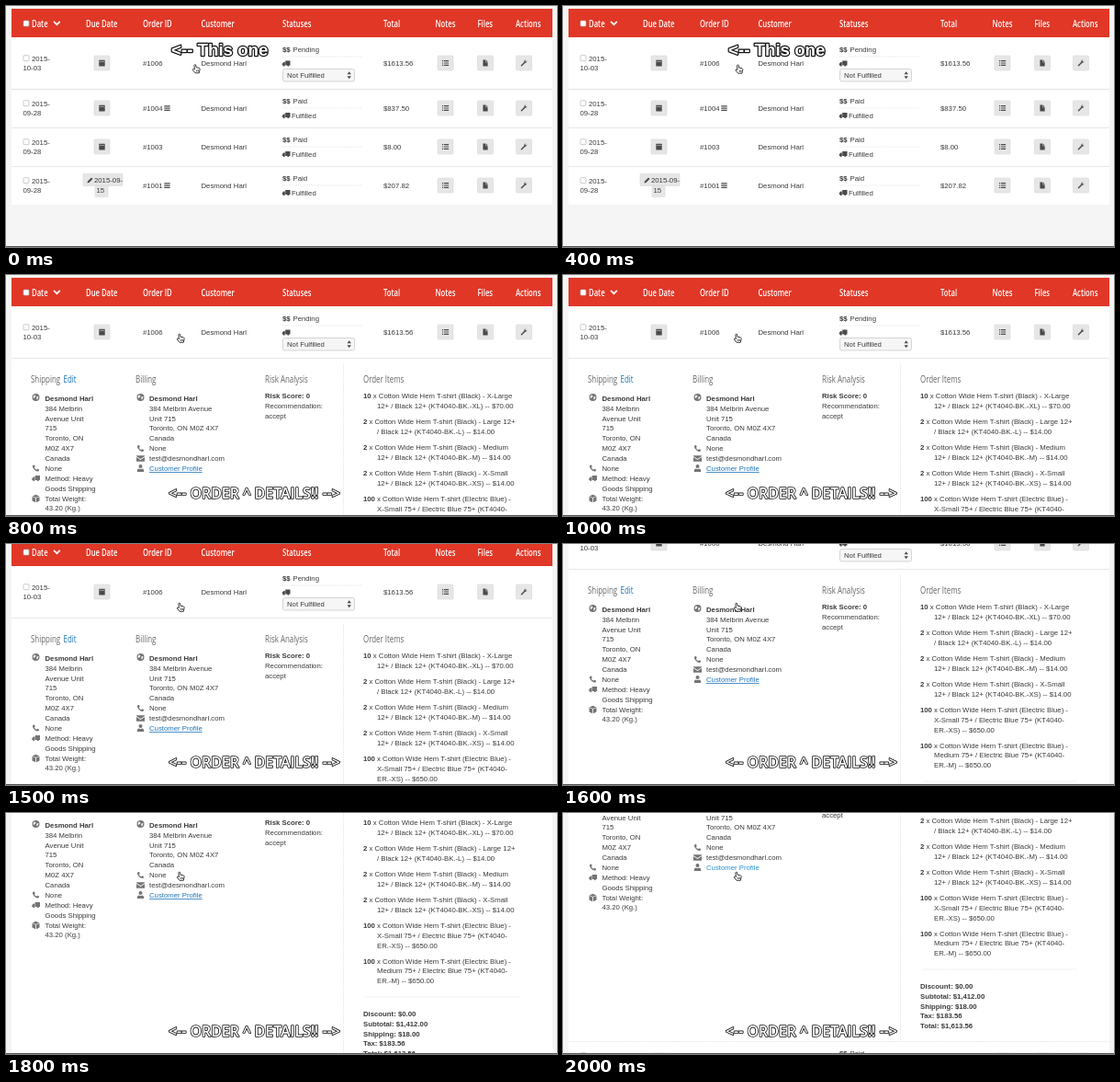
An HTML page that plays this animation: 600x262 px, repeating every 2.8 s.

```html
<!DOCTYPE html>
<html lang="en">
<head>
<meta charset="utf-8">
<title>Order details</title>
<style>
html, body { margin: 0; width: 100%; height: 100%; overflow: hidden; background: #f5f5f5; }
svg { display: block; }
text { font: 7.75px "Liberation Sans", Arial, sans-serif; fill: #3a3a3a; white-space: pre; }
.b { font-weight: 700; }
.head, .title, .edit { font: 11px "Open Sans", "Noto Sans", sans-serif; fill: #666; }
.head { font-weight: 600; fill: #fff; }
.edit, .link { fill: #1b74b8; }
.link { text-decoration: underline; }
.link.hover { fill: #2590d6; text-decoration: none; }
.icon { fill: #4a4a4a; fill-rule: evenodd; }
.soft { fill: #747474; }
.btn { fill: #e6e6e6; stroke: #d8d8d8; stroke-width: .6; }
.box { fill: #fff; stroke: #b5b5b5; stroke-width: .7; }
.select { fill: #f6f6f6; stroke: #c4c4c4; stroke-width: .7; }
.rule { stroke: #e8e8e8; }
.dots { stroke: #dedede; stroke-width: .8; stroke-dasharray: 1.2 1.2; }
.note { font: 700 18.7px "Liberation Sans", Arial, sans-serif; stroke-width: 2.4px; }
.comic { font: 600 15.9px "Open Sans", "Noto Sans", sans-serif; stroke-width: 1.6px; }
.note, .comic { fill: #fff; stroke: #111; stroke-linejoin: round; paint-order: stroke; }
</style>
</head>
<body>
<svg id="stage" width="600" height="262" viewBox="0 0 600 262">
  <rect width="600" height="262" fill="#f5f5f5"/>
  <g id="page">
    <rect id="sheet" x="6" y="3" width="589" height="213" fill="#fff"/>
    <g id="top"></g>
    <svg id="panel" y="90" width="600" height="0" overflow="hidden"><g id="details" transform="translate(0 -90)"></g></svg>
    <g id="rest"></g>
  </g>
  <text id="thisOne" class="note" x="180" y="54">&lt;-- This one</text>
  <text id="caption" class="comic" x="270.5" y="243" text-anchor="middle">&lt;-- ORDER ^ DETAILS!! --&gt;</text>
  <path id="hand" fill="#fff" stroke="#222" stroke-width=".9" stroke-linejoin="round"
    d="M-1.9.8L-2.4-4Q-1.6-5.5-.7-4.3L-.2-1.6 3.1-.9Q4-.5 3.8.8L3 4.5H-1.3L-3.9 1.4Q-4-.3-2.6.2zM.4 1.2V3M2 1.2V3"/>
  <rect y="261" width="600" height="1" fill="#555"/>
</svg>
<script>
const $ = id => document.getElementById(id);
const LINE = 10.87, PANEL = 309, LOOP = 2800;

const ICONS = {
  calendar: 'M-3.2-3.2H3.2V3.4H-3.2zM-2.6-1.5H2.6V-1H-2.6z',
  list: 'M-3.6-3h1.2v1.2h-1.2zM-1.6-3h5.2v1.2h-5.2zM-3.6-.6h1.2v1.2h-1.2zM-1.6-.6h5.2v1.2h-5.2zM-3.6 1.8h1.2v1.2h-1.2zM-1.6 1.8h5.2v1.2h-5.2z',
  file: 'M-2.6-3.4H.4V-.8H2.6V3.4H-2.6zM.9-3.4L2.6-1.3H.9z',
  wrench: 'M-3.4 2.4L.1-1.1Q0-3.4 2.4-3.4L1.3-2.2 2.2-1.3 3.4-2.4Q3.4 0 1.1-.1L-2.4 3.4Q-3.2 3.6-3.4 2.4z',
  pencil: 'M-3 3L-2.5 1 1.5-3 3-1.5-1 2.5z',
  bars: 'M-3.2-2.8h6.4v1.2h-6.4zM-3.2-.5h6.4v1.2h-6.4zM-3.2 1.8h6.4v1.2h-6.4z',
  truck: 'M4.5-3H-.8V2H4.5zM-1.2-1.6H-2.7L-4.2.2V2H-1.2zM-3.4 2.1a1.1 1.1 0 0 0 2.2 0zM1.2 2.1a1.1 1.1 0 0 0 2.2 0z',
  globe: 'M-4 0a4 4 0 1 0 8 0a4 4 0 1 0-8 0zM-2-2.6l2 .5-.5 1.5-1.5 1.5L-3 0zM.8-.5L3-1 2 2 1 2.5z',
  phone: 'M-3-3.2L-1.5-3.6-.7-1.6-1.7-.7Q-1 1 .7 1.7L1.6.7 3.6 1.5 3.2 3Q2 4.2-.4 2.7-2.8 1-3.6-1.5-3.6-2.8-3-3.2z',
  mail: 'M-4.5-3.2H4.5V-2.4L0 .6-4.5-2.4zM-4.5-1.5L0 1.5 4.5-1.5V3.2H-4.5z',
  user: 'M-2-2a2 2 0 1 1 4 0a2 2 0 1 1-4 0zM-3.7 4Q-4 .6-1.5.4 0 1.4 1.5.4 4 .6 3.7 4z',
  cube: 'M0-4.2L3.8-2.6 0-1-3.8-2.6zM-4-1.9L-.4-.4V4.2L-4 2.6zM4-1.9L.4-.4V4.2L4 2.6z'
};

// y is the middle of the text line
const text = (x, y, s, cls = '') => `<text x="${x}" y="${y + 2.8}" class="${cls}">${s}</text>`;
const narrow = (x, y, s, cls) =>
  `<text transform="translate(${x} ${y + 4}) scale(${cls === 'head' ? .7 : .72} 1)" class="${cls}">${s}</text>`;
const lines = (x, y, list, cls) => list.map((s, i) => text(x, y + i * LINE, s, cls)).join('');
const bold = s => `<tspan class="b">${s}</tspan>`;
const icon = (name, x, y, cls = '') => `<path class="icon ${cls}" transform="translate(${x} ${y})" d="${ICONS[name]}"/>`;
const rect = (x, y, w, h, cls, r = 1) => `<rect x="${x}" y="${y}" width="${w}" height="${h}" rx="${r}" class="${cls}"/>`;
const line = (x1, y1, x2, y2, cls) => `<path class="${cls}" d="M${x1} ${y1}L${x2} ${y2}"/>`;
const button = (name, x, y) => rect(x - 8.5, y - 8, 17, 16, 'btn') + icon(name, x, y);

function row(y, o) {
  const first = o.open, dateY = y - 5.3, payY = y - (first ? 14.5 : 7.5);
  let s = rect(19, dateY - 3, 6, 6, 'box') + text(28, dateY, '2015-') + text(18.5, dateY + LINE, o.day);
  if (o.due) {
    s += rect(84, y - 12.5, 43, 13, 'btn') + rect(97, y + .5, 14, 12, 'btn') + icon('pencil', 91.5, y - 5.5)
      + text(96, y - 5.5, '2015-09-') + text(98.5, y + 5.5, '15');
  } else s += button('calendar', 104.5, y);
  s += text(149, y, '#' + o.id) + (o.bars ? icon('bars', 175.5, y) : '') + text(212.5, y, 'Desmond Harl')
    + text(301, payY, bold('$$')) + text(312.5, payY, first ? 'Pending' : 'Paid')
    + line(301, payY + 7.5, 388, payY + 7.5, 'dots');
  if (first) {
    s += icon('truck', 305, y + .5) + rect(301.5, y + 6.5, 78, 13.5, 'select', 2) + text(306, y + 13.2, 'Not Fulfilled')
      + `<path class="icon" d="M371.5 ${y + 12.3}h4.4l-2.2-3zM371.5 ${y + 14.2}h4.4l-2.2 3z"/>`;
  } else s += icon('truck', 305, y + 8) + text(311, y + 8, 'Fulfilled');
  return s + text(411, y, o.total) + button('list', 478.5, y) + button('file', 522, y) + button('wrench', 564, y);
}

const HEADS = [['Date', 28], ['Due Date', 87], ['Order ID', 149], ['Customer', 212.5], ['Statuses', 301],
  ['Total', 411], ['Notes', 467.5], ['Files', 513.5], ['Actions', 555]];

$('top').innerHTML = '<rect x="6" y="3" width="589" height="31" fill="#e03727"/>'
  + HEADS.map(([s, x]) => narrow(x, 18.5, s, 'head')).join('')
  + rect(19, 16, 6, 6, 'box')
  + '<path d="M52 16.8l3.4 3.4 3.4-3.4" fill="none" stroke="#fff" stroke-width="1.7"/>'
  + row(62, { open: true, day: '10-03', id: 1006, total: '$1613.56' })
  + line(6, 90.5, 595, 90.5, 'rule');

$('rest').innerHTML = line(6, 90.5, 595, 90.5, 'dots')
  + [{ id: 1004, bars: true, total: '$837.50' }, { id: 1003, total: '$8.00' }, { id: 1001, bars: true, due: true, total: '$207.82' }]
    .map((o, i) => row(111 + 42 * i, { day: '09-28', ...o }) + (i ? line(6, 90.5 + 42 * i, 595, 90.5 + 42 * i, 'rule') : ''))
    .join('');

function items() {
  const black = [[10, 'X-Large', '12+ / Black 12+ (KT4040-BK.-XL) -- $70.00'],
    [2, 'Large 12+', '/ Black 12+ (KT4040-BK.-L) -- $14.00'],
    [2, 'Medium', '12+ / Black 12+ (KT4040-BK.-M) -- $14.00'],
    [2, 'X-Small', '12+ / Black 12+ (KT4040-BK.-XS) -- $14.00']]
    .map(([n, size, rest]) => [n, '(Black) - ' + size, rest]);
  const blue = [['X-Small', 'XS'], ['Medium', 'M']].map(([size, code]) =>
    [100, '(Electric Blue) -', size + ' 75+ / Electric Blue 75+ (KT4040-', `ER.-${code}) -- $650.00`]);
  let y = 131.2, s = '';
  for (const [n, kind, ...more] of [...black, ...blue]) {
    s += text(389, y, `${bold(n)} x Cotton Wide Hem T-shirt ${kind}`) + lines(404, y + LINE, more);
    y += LINE * (1 + more.length) + 6.2;
  }
  return s;
}

const customer = bold('Desmond Harl');
$('details').innerHTML =
  narrow(27, 113.3, 'Shipping', 'title') + narrow(62.5, 113.3, 'Edit', 'edit')
  + narrow(141, 113.3, 'Billing', 'title') + narrow(282, 113.3, 'Risk Analysis', 'title')
  + narrow(389, 113.3, 'Order Items', 'title')
  + lines(42.5, 134, [customer, '384 Melbrin', 'Avenue Unit', '715', 'Toronto, ON', 'M0Z 4X7', 'Canada', 'None',
    'Method: Heavy', 'Goods Shipping', 'Total Weight:', '43.20 (Kg.)'])
  + lines(156, 134, [customer, '384 Melbrin Avenue', 'Unit 715', 'Toronto, ON M0Z 4X7', 'Canada', 'None',
    'test@desmondharl.com'])
  + text(156, 210.2, 'Customer Profile', 'link')
  + [['globe', 32.5, 133], ['phone', 32.5, 210], ['truck', 32.5, 221], ['cube', 32.5, 243],
    ['globe', 146.5, 133], ['phone', 146.5, 188.5], ['mail', 146.5, 199.5], ['user', 146.5, 210]]
    .map(([n, x, y]) => icon(n, x, y, 'soft')).join('')
  + lines(282, 131.5, [bold('Risk Score: 0'), 'Recommendation:', 'accept'])
  + line(367.5, 97, 367.5, 398, 'dots') + items() + line(392, 321, 560, 321, 'dots')
  + lines(389, 339, ['Discount: $0.00', 'Subtotal: $1,412.00', 'Shipping: $18.00', 'Tax: $183.56', 'Total: $1,613.56'], 'b');
const link = document.querySelector('.link');

const clamp = v => Math.min(1, Math.max(0, v));
const swing = p => .5 - Math.cos(Math.PI * clamp(p)) / 2;
const SCROLL = [0, 10, 63, 96, 121, 139, 151];

function draw(now) {
  const t = Math.floor(now % LOOP / 100) * 100;
  const open = PANEL * swing((t - 564) / 400);
  const scroll = SCROLL[Math.min(6, Math.max(0, t / 100 - 14))];
  $('panel').setAttribute('height', open);
  $('sheet').setAttribute('height', 213 + open);
  $('rest').setAttribute('transform', `translate(0 ${open})`);
  $('page').setAttribute('transform', `translate(0 ${-scroll})`);
  $('hand').setAttribute('transform', `translate(${207.3 - 17 * swing(t / 500)} ${68.3 + .5 * clamp(t / 500)})`);
  $('thisOne').style.display = t < 700 ? '' : 'none';
  $('caption').style.display = t >= 800 ? '' : 'none';
  link.classList.toggle('hover', scroll > 145);
}

function tick() {
  draw(performance.now());
  requestAnimationFrame(tick);
}
tick();
</script>
</body>
</html>
```
